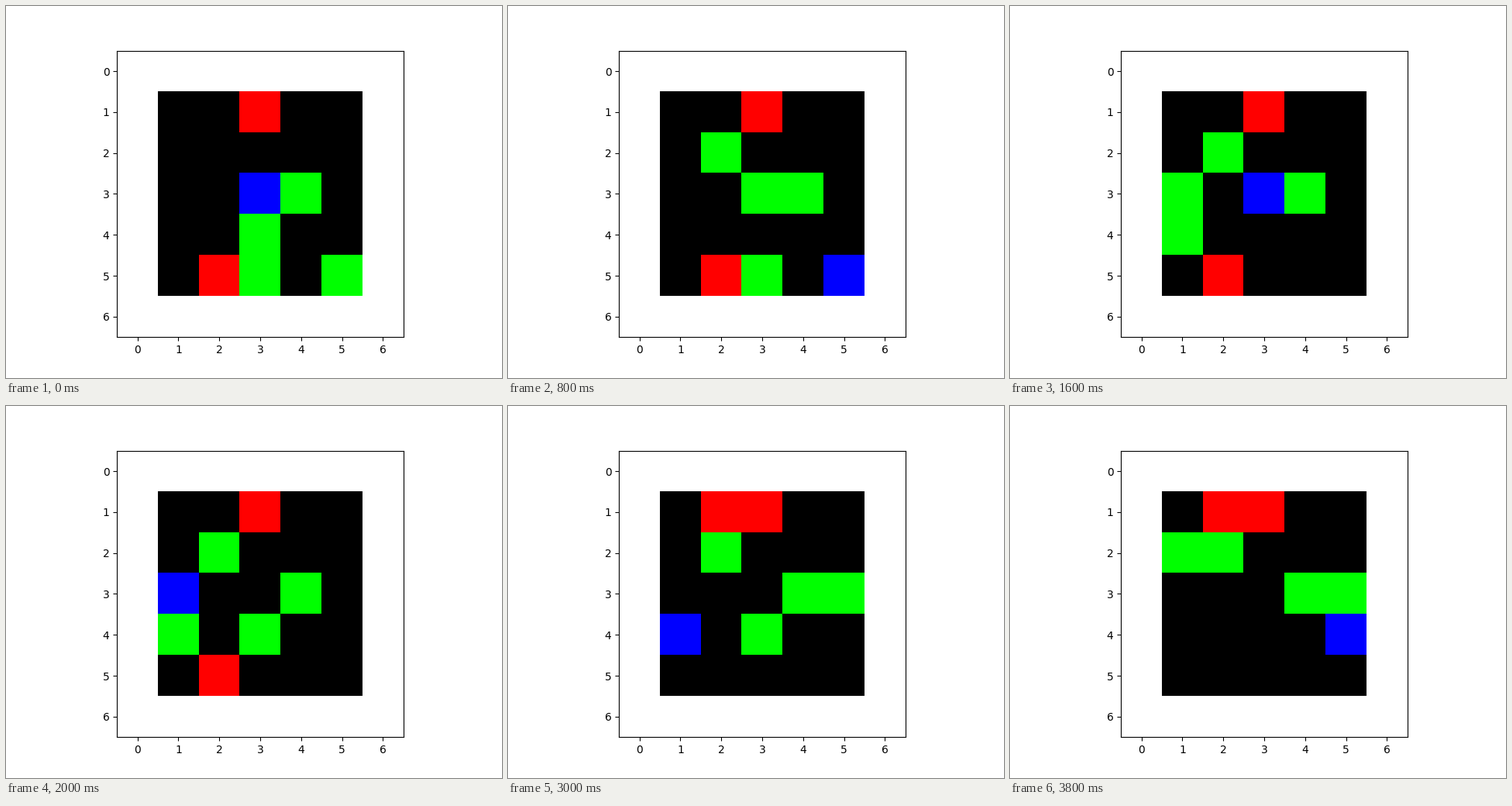
Write a matplotlib script that moves like this. It is 640 px wide and 480 px high and loops after 4000 ms.

```python
import numpy as np
import matplotlib.pyplot as plt
from matplotlib.animation import FuncAnimation

SIZE = 7
RED, GREEN, BLUE = (255, 0, 0), (0, 255, 0), (0, 0, 255)
STEPS = {"U": (-1, 0), "D": (1, 0), "L": (0, -1), "R": (0, 1)}
MOVES = "DRRDLLUULLRDDLURRRR"
START = (3, 3)
ITEMS = {(1, 3): RED, (5, 2): RED,
         (3, 4): GREEN, (4, 3): GREEN, (5, 3): GREEN, (5, 5): GREEN}
# Where each eaten item reappears, in order of eating
RESPAWNS = [(3, 3), (2, 2), (3, 1), (4, 1), (4, 3), (1, 2), (3, 5), (2, 1)]


def grid_at(step):
    """Replay the walk up to a step and paint the board."""
    pos, items, spawns = START, dict(ITEMS), iter(RESPAWNS)
    for move in MOVES[:step]:
        dr, dc = STEPS[move]
        pos = (pos[0] + dr, pos[1] + dc)
        if pos in items:
            color = items.pop(pos)
            items[next(spawns)] = color

    grid = np.full((SIZE, SIZE, 3), 255, dtype=np.uint8)
    grid[1:-1, 1:-1] = 0
    for cell, color in items.items():
        grid[cell] = color
    grid[pos] = BLUE
    return grid


fig, ax = plt.subplots(figsize=(6.4, 4.8), dpi=100)
image = ax.imshow(grid_at(0), interpolation="nearest")
ax.set_xticks(range(SIZE))
ax.set_yticks(range(SIZE))


def update(step):
    image.set_data(grid_at(step))
    return [image]


anim = FuncAnimation(fig, update, frames=len(MOVES) + 1, interval=200,
                     repeat=True, repeat_delay=0)
plt.show()
```
